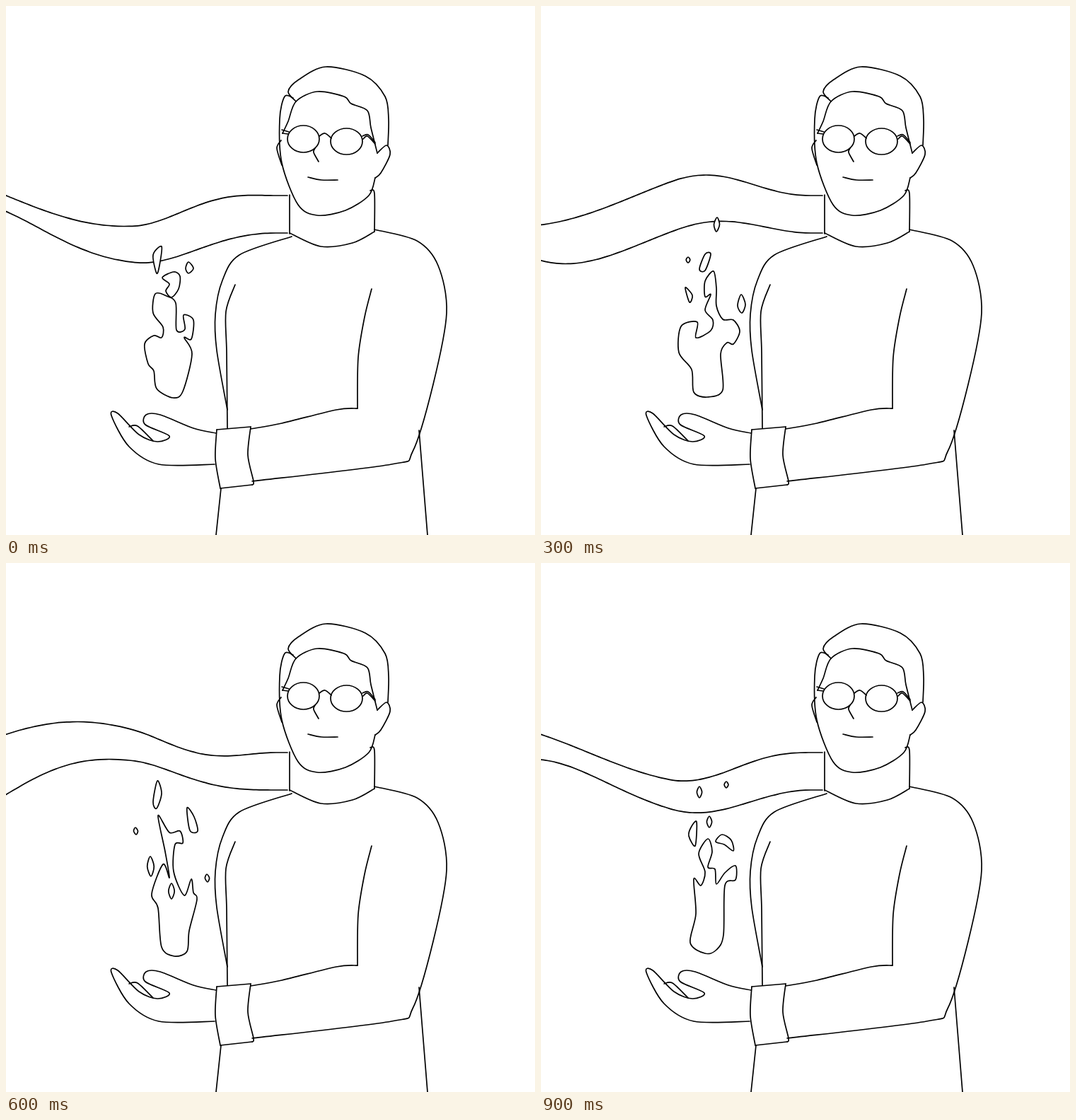
Recreate the animation shown at these times as an HTML page with a canvas. Size 748 px wide and 748 px high, loop 1000 ms.

```html
<!DOCTYPE html>
<html lang="en">
<head>
<meta charset="utf-8">
<title>Flame in hand</title>
<style>
html, body { margin: 0; width: 100%; height: 100%; overflow: hidden; background: #fff; }
canvas { display: block; }
</style>
</head>
<body>
<canvas id="stage" width="748" height="748"></canvas>
<script>
const ctx = document.getElementById('stage').getContext('2d');
const STEP = 100, STEPS = 10, AXIS = 235;
const figure = [], flames = [];

// Smooth curve through the given points.
function curve(pts, closed) {
  const n = pts.length, path = new Path2D();
  const at = i => closed ? pts[(i + n) % n] : pts[Math.max(0, Math.min(n - 1, i))];
  path.moveTo(...pts[0]);
  for (let i = 0; i < (closed ? n : n - 1); i++) {
    const [a, b, c, d] = [at(i - 1), at(i), at(i + 1), at(i + 2)];
    path.bezierCurveTo(
      b[0] + (c[0] - a[0]) / 6.5, b[1] + (c[1] - a[1]) / 6.5,
      c[0] - (d[0] - b[0]) / 6.5, c[1] - (d[1] - b[1]) / 6.5, c[0], c[1]);
  }
  return path;
}

const parse = text => text.split(' ').map(p => p.split(',').map(Number));

function ink(...lines) {
  for (const s of lines) figure.push(curve(parse(s)));
}

function lens(x, y, rx, ry) {
  const path = new Path2D();
  path.ellipse(x, y, rx, ry, 0, 0, 7);
  figure.push(path);
}

// Two points stand for a spark: its top and its bottom.
function spark([[x0, y0], [x1, y1]]) {
  const w = 2 + (y1 - y0) / 10, x = (x0 + x1) / 2, y = (y0 + y1) / 2;
  return [[x0, y0], [x + w, y], [x1, y1], [x - w, y]];
}

function flame(step, ...shapes) {
  flames[step] = shapes.map(s => {
    const pts = parse(s);
    return pts.length === 2 ? spark(pts) : pts;
  });
}

// Hair
ink('410,135 399,121 414,104 452,86 508,99 536,128 541,160 540,197',
  '391,180 399,163 410,135 440,121 478,128 488,138 511,148 516,172 525,208');
// Face and ears
ink('406,130 394,128 387,160 390,222 413,281 440,296 480,289 513,268 522,243',
  '525,208 538,197 543,210 530,236 522,243', '389,190 383,201 390,225',
  '437,201 435,207 442,220', '427,242 446,246 469,246');
// Glasses
lens(420.5, 188, 22.5, 19);
lens(481.5, 191.5, 22.5, 18.5);
ink('443,184 451,180 460,187', '390,175 400,178', '391,180 399,181',
  '504,184 512,182 522,193', '505,188 511,184 522,195');
// Collar and sweater
ink('401,267 401,322', '401,321 445,340 490,335 521,319', '521,319 521,265 515,261',
  '404,326 330,352 306,388 296,436 298,487 313,571', '324,394 311,432 312,490 313,597',
  '521,316 581,332 611,367 623,434 604,535 575,630 545,648 348,672',
  '304,682 297,748', '584,600 596,748');
// Sleeve, cuff and hand
ink('517,400 507,440 498,497 497,569', '497,569 467,571 390,590 346,598',
  '298,599 346,595', '346,595 342,635 350,672 348,677', '348,677 303,682', '303,682 296,640 298,599',
  '297,604 265,597 218,578 198,578 197,592 231,608 214,616 188,606 158,576 149,579 174,623 216,648 295,648',
  '174,595 186,594 208,615');

flame(0,
  '236,554 213,541 209,516 201,506 196,478 209,466 220,469 222,454 208,434 211,407 227,410 240,420 241,458 253,457 251,437 265,444 262,471 252,469 263,492 250,545',
  '221,384 237,376 246,382 244,400 234,412 226,403 231,393',
  '213,378 208,352 220,340 217,367', '254,371 258,362 265,371 258,378');
flame(2,
  '235,553 213,543 216,492 207,476 198,478 189,460 198,444 213,443 222,424 222,399 226,375 238,389 238,411 230,408 238,430 227,444 230,459 251,469 249,447 272,453 275,490 257,514 254,546',
  '221,299 222,319', '230,351 238,351 246,372 238,374', '262,355 262,363',
  '256,409 266,398 260,419', '187,408 192,424 186,434 181,422');
flame(4,
  '232,555 205,540 205,511 216,509 215,480 201,468 197,435 211,426 214,372 219,390 231,402 230,429 238,428 237,414 247,415 252,391 271,427 267,449 246,442 250,472 260,478 261,501 269,500 271,484 280,499 258,514 252,545',
  '228,352 234,370 227,384 223,368', '237,334 237,341', '186,379 186,389',
  '189,395 204,405 203,416 185,419 190,408', '240,384 246,382 238,402');
flame(5,
  '234,557 216,542 218,515 209,502 201,460 206,437 203,406 218,394 225,411 241,381 239,397 252,405 255,420 270,429 262,441 246,428 241,444 253,488 254,480 265,478 257,500 266,520 250,549',
  '203,428 221,430 220,454 207,450',
  '212,319 223,345 215,362 207,348 213,338', '218,366 217,380', '186,378 186,393',
  '248,375 254,360 265,364 272,378 265,391', '255,393 255,403', '276,448 284,445 285,456');
flame(6,
  '238,556 220,543 215,488 206,468 222,426 231,445 225,408 215,357 231,381 246,379 250,396 239,398 237,436 252,470 262,447 265,466 270,476 259,520 256,549',
  '214,308 220,326 213,347 208,338', '256,346 266,359 271,379 260,378',
  '183,374 184,384', '204,415 205,443', '284,440 285,451', '234,453 234,475');
flame(7,
  '235,557 217,542 221,508 215,462 207,425 226,400 231,418 228,450 239,456 237,426 259,445 250,492 258,526 250,550',
  '213,304 219,327 209,326', '262,335 262,360',
  '218,345 228,356 229,378 243,388 233,405 212,382 219,363', '245,370 244,387', '204,402 205,418');
flame(9,
  '232,552 211,537 219,496 216,447 226,456 232,437 223,411 236,390 242,408 236,430 246,433 248,454 260,438 275,428 275,448 260,456 258,526 248,547',
  '224,316 224,332', '262,309 262,318', '238,358 238,374',
  '212,374 220,366 218,400 209,386', '247,394 256,384 269,392 272,407 259,398');
// The remaining steps flip the flame before them.
for (const step of [1, 3, 8])
  flames[step] = flames[step - 1].map(s => s.map(([x, y]) => [2 * AXIS - x, y]));
const fires = flames.map(f => f.map(pts => curve(pts, true)));

// Scarf edge: a travelling wave that fades out towards the collar.
function edge(base, lag, step) {
  const pts = [];
  for (let x = -10; x <= 402; x += 8) {
    const t = Math.max(0, Math.min(1, (381 - x) / 200));
    const phase = (x - lag(x)) / 670 + step / STEPS;
    pts.push([x, base + 43.5 * t * t * (3 - 2 * t) * Math.sin(2 * Math.PI * phase)]);
  }
  return curve(pts);
}

ctx.lineWidth = 1.7;
ctx.lineJoin = ctx.lineCap = 'round';

function draw(now) {
  const step = Math.floor(now / STEP) % STEPS;
  ctx.fillStyle = '#fff';
  ctx.fillRect(0, 0, 748, 748);
  ctx.stroke(edge(268, () => 0, step));
  ctx.stroke(edge(321, x => 45 + ((x - 160) / 26) ** 2, step));
  for (const path of figure) ctx.stroke(path);
  for (const path of fires[step]) {
    ctx.fill(path);
    ctx.stroke(path);
  }
}

function tick() {
  draw(performance.now());
  requestAnimationFrame(tick);
}
tick();
</script>
</body>
</html>
```
